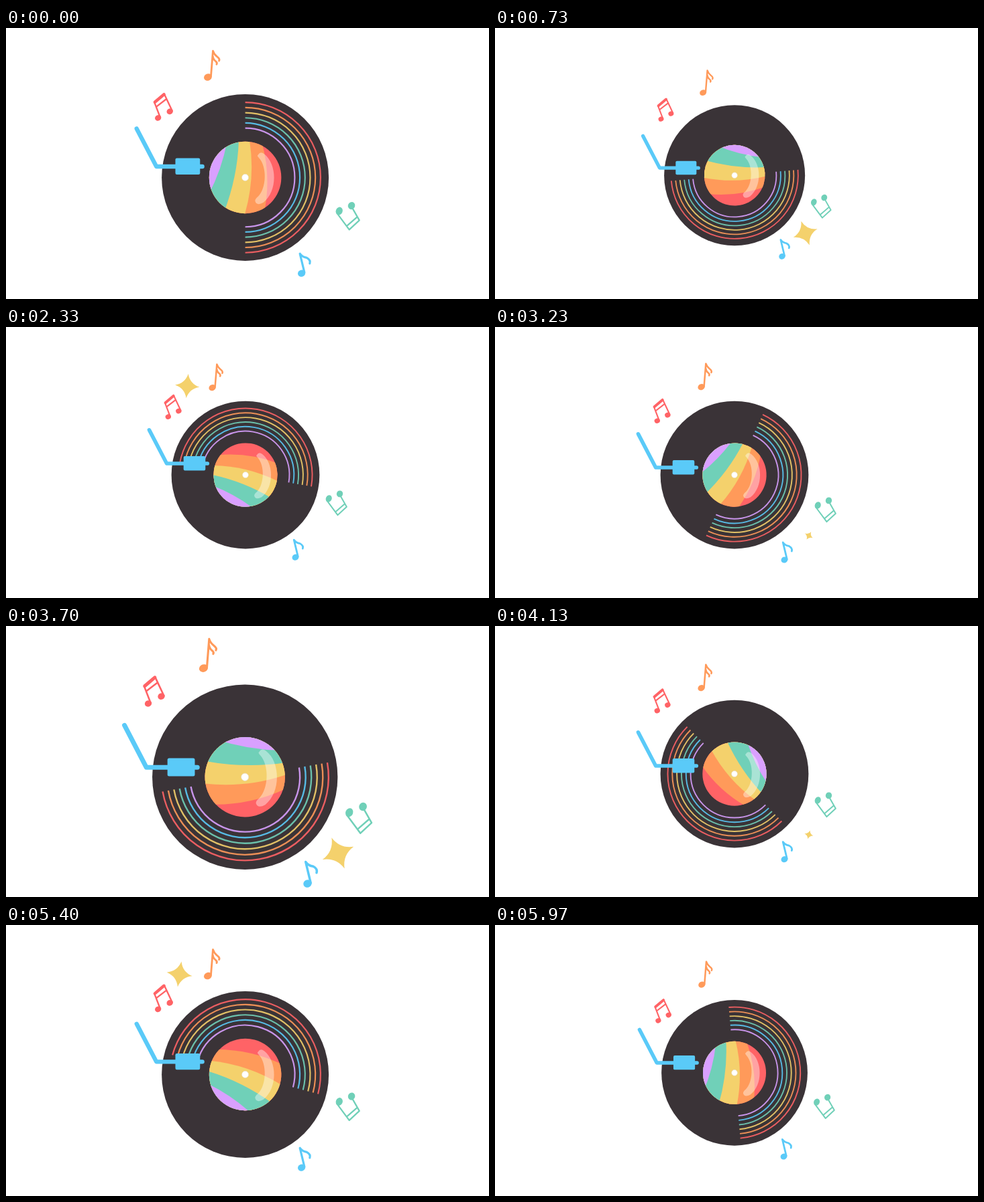
An HTML page with a canvas for the animation above (6.01 s loop, 720 by 405 pixels).

```html
<!DOCTYPE html>
<html lang="en">
<head>
<meta charset="utf-8">
<title>Spinning record</title>
<style>
html, body { margin: 0; height: 100%; overflow: hidden; background: #fff; }
canvas { display: block; }
</style>
</head>
<body>
<canvas id="stage" width="720" height="405"></canvas>
<script>
const ctx = document.getElementById('stage').getContext('2d');
const LOOP = 6010;
const RED = '#ff6366', ORANGE = '#ff9a5a', YELLOW = '#f4d16c',
      TEAL = '#70d0b8', BLUE = '#5acaf8', PURPLE = '#d9a0ff', DARK = '#3a3337';

// Vertical sway of each part, keyed over a 72-step cycle
const KEYS = [0, 5, 27, 34, 42, 56, 71, 72];
const SWAY = {
  red:    [15, 13, -.5, 0, 1.4, 7, 15, 15],
  orange: [-4.5, -3, 0, 0, -.2, -2, -5, -4.5],
  blue:   [0, 0, .7, 0, -4, -3.8, 0, 0],
  green:  [6, 7, 1, 0, -1.4, -3, 6, 6],
  arm:    [-4.5, -1, -2, 0, 2, -7, -5, -4.5]
};

function sway(part, step) {
  const v = SWAY[part];
  let i = 0;
  while (step >= KEYS[i + 1]) i++;
  return v[i] + (v[i + 1] - v[i]) * (step - KEYS[i]) / (KEYS[i + 1] - KEYS[i]);
}

// Beat every 27 ticks: quick swell, slower release
function zoom(tick) {
  const d = (tick + 22.5) % 27, fall = 17.7;
  const u = (d - fall) / (27 - fall);
  const level = d < fall ? (1 - d / fall) ** 1.85 : (u + u * u * (3 - 2 * u)) / 2;
  return (105 + 37.5 * level) / 110;
}

function at(x, y, draw) {
  ctx.save();
  ctx.translate(x, y);
  draw();
  ctx.restore();
}

function fill(path, color) {
  ctx.fillStyle = color;
  ctx.fill(new Path2D(path));
}

function line(path, color, width) {
  ctx.strokeStyle = color;
  ctx.lineWidth = width;
  ctx.stroke(new Path2D(path));
}

function blob(x, y, rx, ry, tilt, color) {
  ctx.beginPath();
  ctx.ellipse(x, y, rx, ry, tilt, 0, 7);
  ctx.fillStyle = color;
  ctx.fill();
}

function grooves() {
  ctx.lineCap = 'butt';
  ctx.lineWidth = 1.9;
  ctx.globalAlpha = .9;
  [RED, ORANGE, YELLOW, TEAL, BLUE, PURPLE].forEach((color, i) => {
    ctx.beginPath();
    ctx.arc(0, 0, 99.2 - 6.8 * i, -Math.PI / 2, Math.PI / 2);
    ctx.strokeStyle = color;
    ctx.stroke();
  });
  ctx.globalAlpha = 1;
}

function label() {
  ctx.beginPath();
  ctx.arc(0, 0, 47.5, 0, 7);
  ctx.fillStyle = RED;
  ctx.fill();
  ctx.clip();
  const left = 'L-70 60V-60Z';
  fill('M22-46Q34.5 0 25 46' + left, ORANGE);
  fill('M5.5-50Q13.75 0-1 50' + left, YELLOW);
  fill('M-8.5-50Q-9.75-2-28 46' + left, TEAL);
  fill('M-24-47Q-31-9.5-50 26' + left, PURPLE);
}

function record(angle) {
  blob(0, 0, 110, 110, 0, DARK);
  ctx.save();
  ctx.rotate(angle);
  grooves();
  label();
  ctx.restore();
  fill('M17-30Q20-35 25-31C42-18 43 18 24 33Q15 38 13 31Q13 28 17 25C28 14 29-14 18-26Q15-29 17-30Z',
    'rgba(255,255,255,.4)');
  blob(0, 0, 4.5, 4.5, 0, '#fff');
  ctx.strokeStyle = '#e6d9b8';
  ctx.lineWidth = .6;
  ctx.stroke();
}

function star(x, y, r, degrees) {
  if (r <= 0) return;
  at(x, y, () => {
    ctx.rotate(degrees * Math.PI / 180);
    const c = r * .2;
    fill(`M0 ${-r}Q${c} ${-c} ${r} 0Q${c} ${c} 0 ${r}Q${-c} ${c} ${-r} 0Q${-c} ${-c} 0 ${-r}Z`, YELLOW);
  });
}

const parts = {
  arm() {
    line('M214 161L240 211H300.5', BLUE, 5.6);
    ctx.beginPath();
    ctx.roundRect(265, 200, 32.5, 21.5, 2);
    ctx.fillStyle = BLUE;
    ctx.fill();
  },
  orange() {
    blob(307.8, 93, 5.3, 4.5, -.4, ORANGE);
    line('M311.8 92L314.5 58.2Q316 63 320 66Q324 69 322.5 71.5M314.2 65Q315 70 318 72Q320.5 74 319.3 76', ORANGE, 2.5);
  },
  red() {
    blob(242.2, 127.3, 4.2, 3.7, -.4, RED);
    blob(257.7, 118.8, 4.2, 3.8, -.4, RED);
    line('M237.5 107L245 126.5M250.5 96L260.8 118M240 112.5L253 102.5', RED, 2.1);
    line('M238 106.5L250 96.3', RED, 4);
  },
  blue() {
    blob(431.2, 347.5, 5, 4.5, -.4, BLUE);
    line('M435 346.5L429 321.5Q432 326 438 327Q443.5 330 442 334.5', BLUE, 2.8);
  },
  green() {
    blob(480.8, 259.2, 4.4, 5.3, .4, TEAL);
    blob(497, 252.2, 4.6, 5, .4, TEAL);
    line('M477.8 262L494 283.8L507.3 271.5L498.5 256M490.5 279.2L504.5 267', TEAL, 2);
  }
};

function render(now) {
  const tick = Math.min(179, Math.floor((now % LOOP + 5) * .03));
  const step = Math.floor(tick * .8 + 1e-6);   // drawing runs at 24 steps a second
  const k = step % 72;
  const s = zoom(tick % 27);

  ctx.setTransform(1, 0, 0, 1, 0, 0);
  ctx.fillStyle = '#fff';
  ctx.fillRect(0, 0, 720, 405);
  ctx.translate(360, 202.5);
  ctx.scale(s, s);
  ctx.translate(-360, -202.5);

  at(357, 221, () => record(step * 5 * Math.PI / 180));
  ctx.lineCap = ctx.lineJoin = 'round';
  for (const name in parts) at(0, sway(name, k), parts[name]);

  if (k > 36 && k < 66) star(270.5, 88.5, 21 * Math.sin(Math.PI * (k - 36) / 30), 5 + (k - 56) * 3.4);
  if (k > 2 && k < 30) star(467.5, 311.5, 20 * Math.sin(Math.PI * (k - 2) / 28), 30 + (k - 5) * 3.4);
}

const start = performance.now();
function loop() {
  render(performance.now() - start);
  requestAnimationFrame(loop);
}
loop();
</script>
</body>
</html>
```
